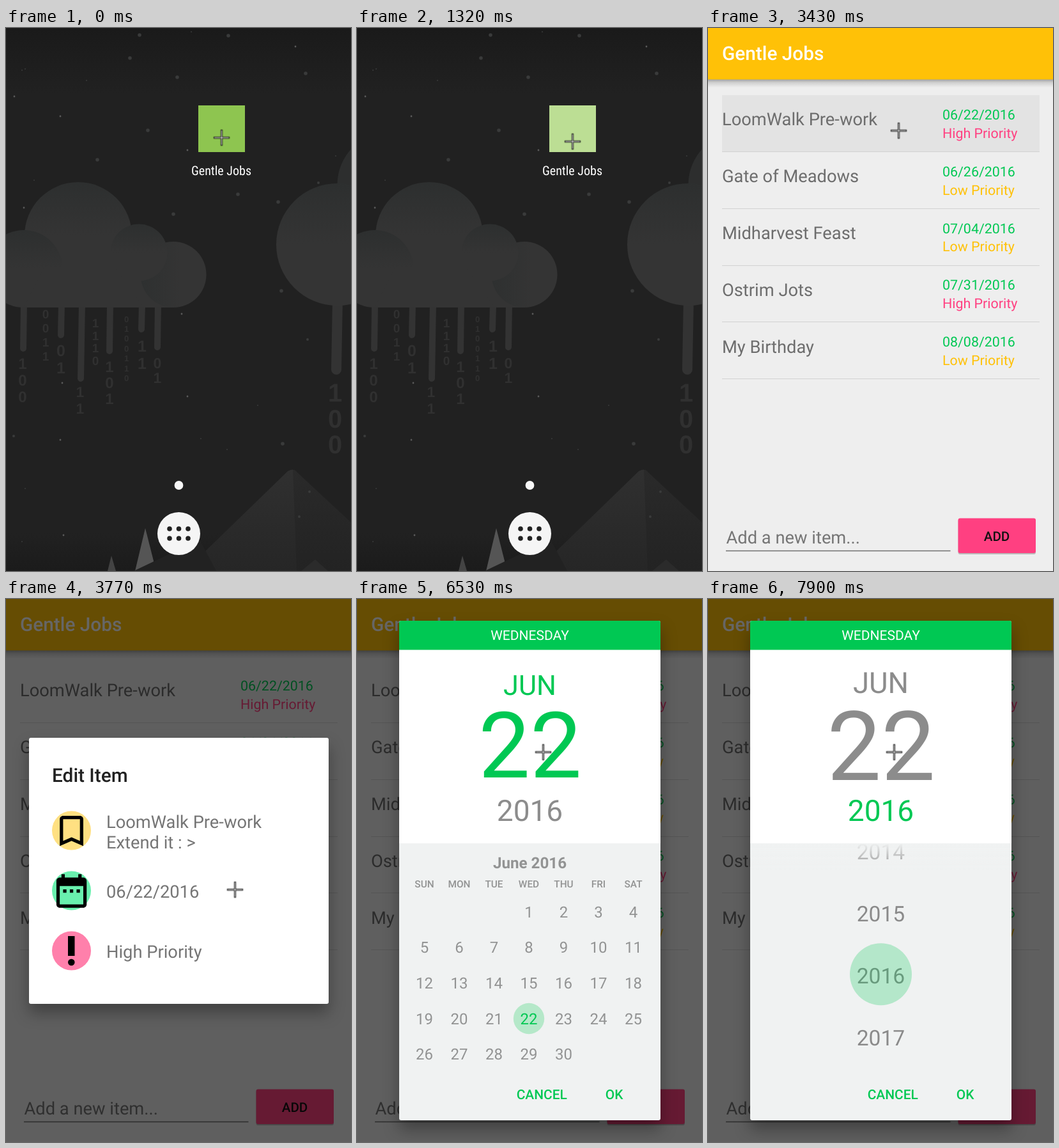
These frames come from a looping animation (540 by 849 pixels, 8000 ms). An HTML page:

```html
<!DOCTYPE html>
<html lang="en">
<head>
<meta charset="utf-8">
<title>Gentle Jobs</title>
<style>
html, body { margin: 0; width: 100%; height: 100%; overflow: hidden; background: #eee; }
svg { display: block; width: 540px; height: 849px; font-family: Roboto, "Open Sans", sans-serif; text-rendering: geometricPrecision; }
.mid { text-anchor: middle; }
.med { font-weight: 500; }
.body { font-size: 27.3px; fill: #6d6d6d; }
.meta { font-size: 21.4px; fill: #00c853; }
.high { fill: #ff4081; }
.low { fill: #ffc107; }
.stars { stroke: #3a3b3b; stroke-linecap: round; fill: none; }
.rain { stroke: #333; stroke-width: 10; stroke-linecap: round; fill: none; }
.bits { font-family: "Liberation Sans", Arial, sans-serif; font-weight: bold; fill: #303030; }
.sheet { filter: drop-shadow(0 14px 12px rgba(0, 0, 0, .32)); }
.grey { fill: #929393; }

/* hard cuts only */
.home, .icon, .press, .dim, .edit, .picker, .days, .years, .date, .year, .cursor {
  animation: 8s step-end infinite;
}
.home { animation-name: home; }
.icon { fill: #8ec550; animation-name: icon; }
.press { animation-name: press; }
.dim { animation-name: dim; }
.edit { animation-name: edit; }
.picker { animation-name: picker; }
.days { animation-name: days; }
.years { animation-name: years; }
.date { transform-origin: 271px 198px; animation-name: date; }
.year { transform-origin: 270.5px 331px; animation-name: year; }
.cursor { animation-name: cursor; }

@keyframes home { 0% { visibility: visible; } 21.125%, 100% { visibility: hidden; } }
@keyframes icon { 0% { fill: #8ec550; } 16.5%, 100% { fill: #bcde94; } }
@keyframes press { 0% { visibility: hidden; } 42.875% { visibility: visible; } 47.125%, 100% { visibility: hidden; } }
@keyframes dim { 0% { visibility: hidden; } 47.125%, 100% { visibility: visible; } }
@keyframes edit { 0% { visibility: hidden; } 47.125% { visibility: visible; } 68.25%, 100% { visibility: hidden; } }
@keyframes picker { 0% { opacity: 0; } 68.25%, 100% { opacity: 1; } }
@keyframes days { 0% { visibility: visible; } 85.625%, 100% { visibility: hidden; } }
@keyframes years { 0% { visibility: hidden; } 85.625%, 100% { visibility: visible; } }
@keyframes date {
  0% { transform: none; fill: #00c853; }
  72.625% { transform: scale(1.038); fill: #00c853; }
  77.125% { transform: none; fill: #00c853; }
  81.625% { transform: scale(.95); fill: #00c853; }
  85.625%, 100% { transform: none; fill: #8c8c8c; }
}
@keyframes year {
  0% { transform: none; fill: #8c8c8c; }
  85.625% { transform: scale(1.04); fill: #00c853; }
  94.375%, 100% { transform: none; fill: #00c853; }
}
@keyframes cursor {
  0% { transform: translate(337.5px, 171.5px); }
  16.5% { transform: translate(337.5px, 177.5px); }
  21.125% { transform: translate(298.5px, 160.5px); }
  47.125% { transform: translate(358.5px, 454.5px); }
  77.125% { transform: translate(291.5px, 239.5px); }
  85.625% { transform: translate(450.5px, 580.5px); }
  98.75%, 100% { transform: translate(291.5px, 239.5px); }
}
</style>
</head>
<body>
<svg viewBox="0 0 540 849" xmlns="http://www.w3.org/2000/svg">
  <defs>
    <linearGradient id="sky" x2="0" y2="1">
      <stop offset="0" stop-color="#1a1a1a"/><stop offset=".12" stop-color="#212121"/>
      <stop offset=".93" stop-color="#212121"/><stop offset="1" stop-color="#1b1b1b"/>
    </linearGradient>
    <linearGradient id="puff" x2="0" y2="1">
      <stop offset="0" stop-color="#2d2f2f"/><stop offset=".5" stop-color="#343434"/>
    </linearGradient>
    <linearGradient id="puffSide">
      <stop offset="0" stop-color="#2e3030"/><stop offset=".6" stop-color="#343434"/>
    </linearGradient>
    <linearGradient id="slope" x2="0" y2="1">
      <stop offset="0" stop-color="#303030"/><stop offset="1" stop-color="#262626"/>
    </linearGradient>
    <linearGradient id="slopeDark" x2="0" y2="1">
      <stop offset="0" stop-color="#2a2a2a"/><stop offset="1" stop-color="#232323"/>
    </linearGradient>
    <linearGradient id="barShade" x2="0" y2="1">
      <stop offset="0" stop-opacity=".34"/><stop offset=".4" stop-opacity=".13"/><stop offset="1" stop-opacity="0"/>
    </linearGradient>
    <linearGradient id="fade" x2="0" y2="1">
      <stop offset="0" stop-color="#f0f2f2"/><stop offset="1" stop-color="#f0f2f2" stop-opacity="0"/>
    </linearGradient>
    <clipPath id="panel"><path d="M66 382h409v350H66z"/></clipPath>
  </defs>

  <!-- list screen -->
  <rect width="540" height="849" fill="#eee"/>
  <rect y="80" width="540" height="13" fill="url(#barShade)"/>
  <rect width="540" height="80.5" fill="#ffc107"/>
  <text class="med" x="22" y="50" font-size="29.8" fill="#fff">Gentle Jobs</text>
  <rect class="press" x="22" y="105" width="497" height="88" fill="#e3e3e3"/>
  <g id="list"></g>
  <text class="body" x="28.5" y="806" style="fill:#757575">Add a new item...</text>
  <path d="M28 817.5h351.5" stroke="#707070" stroke-width="1.4"/>
  <rect x="391.5" y="768" width="121.5" height="55" rx="3" fill="#000" opacity=".22"/>
  <rect x="391.5" y="766.5" width="121.5" height="54.5" rx="3" fill="#ff4081"/>
  <text class="mid med" x="452" y="802" font-size="20.6" fill="#111">ADD</text>

  <rect class="dim" width="540" height="849" opacity=".6"/>

  <!-- edit dialog -->
  <g class="edit">
    <rect class="sheet" x="36" y="217" width="469" height="416" rx="3" fill="#fff"/>
    <text class="med" x="72" y="286" font-size="29.8" fill="#212121">Edit Item</text>
    <circle cx="102.5" cy="362" r="30.5" fill="#ffe082"/>
    <circle cx="102.5" cy="456" r="30.5" fill="#69f0ae"/>
    <circle cx="102.5" cy="550" r="30.5" fill="#ff80ab"/>
    <path transform="translate(71 331) scale(2.63)" d="M17 3H7c-1.1 0-2 .9-2 2v16l7-3 7 3V5c0-1.1-.9-2-2-2zm0 15l-5-2.18L7 18V5h10v13z"/>
    <path transform="translate(71 425) scale(2.63)" d="M9 11H7v2h2v-2zm4 0h-2v2h2v-2zm4 0h-2v2h2v-2zm2-7h-1V2h-2v2H8V2H6v2H5c-1.1 0-2 .9-2 2v14c0 1.1.9 2 2 2h14c1.1 0 2-.9 2-2V6c0-1.1-.9-2-2-2zm0 16H5V9h14v11z"/>
    <path d="M97 527h10.5v31H97z"/><circle cx="102.3" cy="568" r="5.3"/>
    <g class="body" style="fill:#757575">
      <text x="157" y="357.5">LoomWalk Pre-work</text>
      <text x="157" y="389.5">Extend it : &gt;</text>
      <text x="157" y="467">06/22/2016</text>
      <text x="157" y="561">High Priority</text>
    </g>
  </g>

  <!-- date picker -->
  <g class="picker">
    <rect class="sheet" x="66" y="34" width="409" height="781" rx="3" fill="#f0f2f2"/>
    <path d="M66 79.5h409V382H66z" fill="#fff"/>
    <path d="M66 79.5V37q0-3 3-3h403q3 0 3 3v42.5z" fill="#00c853"/>
    <text class="mid" x="270.5" y="64" font-size="21" fill="#fff">WEDNESDAY</text>
    <g class="date mid">
      <text x="270.5" y="147" font-size="45.6">JUN</text>
      <text x="271" y="283" font-size="151">22</text>
    </g>
    <text class="year mid" x="270.5" y="347" font-size="46">2016</text>
    <g class="days mid grey">
      <text x="270.5" y="421" font-size="24.2" font-weight="700">June 2016</text>
      <g id="week" class="med" font-size="15.4"></g>
      <circle cx="269" cy="656" r="24.2" fill="#b5e8c9"/>
      <g id="month" font-size="24"></g>
    </g>
    <g class="years mid" clip-path="url(#panel)">
      <g id="decade" font-size="33.6" fill="#8a8a8a"></g>
      <circle cx="270.5" cy="586.7" r="48.5" fill="#00c853" opacity=".25"/>
      <path d="M66 382h409v42H66z" fill="url(#fade)"/>
    </g>
    <g class="mid med" font-size="20.9" fill="#00c853">
      <text x="289.3" y="781.5">CANCEL</text>
      <text x="402.5" y="781.5">OK</text>
    </g>
  </g>

  <!-- home screen -->
  <g class="home">
    <rect width="540" height="849" fill="url(#sky)"/>
    <g class="stars">
      <path stroke-width="5.6" d="M209 11h0M348 12h0M194 47h0M268 77h0M469 71h0M222 160h0M143 206h0M262 291h0M363 260h0M426 272h0M431 411h0M433 650h0"/>
      <path stroke-width="4" d="M472 487h0M12 638h0M489 242h0"/>
      <path stroke-width="2.8" stroke="#5a5a5a" d="M85 138h0M13 107h0M453 29h0M284 191h0M28 281h0M275 447h0M284 576h0M85 644h0M90 793h0M88 555h0"/>
      <path stroke-width="2" d="M290 6h0M126 82h0M30 64h0M25 66h0M394 590h0M305 642h0M346 659h0M25 803h0M30 720h0M516 200h0M44 238h0"/>
    </g>
    <path class="rain" d="M28 430l-1 71M87 430l-1 50M119 430l-2 118M163 430l-1 75M213 430l-1 41M238 430l-1 69"/>
    <path class="rain" stroke-width="16" style="stroke-width:16px" d="M519 425l-2 109"/>
    <g id="bits" class="bits mid"></g>
    <circle cx="113" cy="325" r="84" fill="url(#puff)"/>
    <path d="M28 374h234v63H28z" fill="#343434"/>
    <circle cx="28" cy="376.5" r="60.5" fill="url(#puff)"/>
    <circle cx="262" cy="385.5" r="51.5" fill="url(#puffSide)"/>
    <circle cx="208" cy="351" r="44.5" fill="url(#puff)"/>
    <path d="M60 374h110l45 62H28z" fill="#343434"/>
    <circle cx="601" cy="245" r="82.5" fill="#2d2e2e"/>
    <circle cx="518.5" cy="338.5" r="95.5" fill="url(#puff)"/>
    <path d="M280 849L441 693q8-5 13 0l3 156z" fill="url(#slope)"/>
    <path d="M449 691q4 0 7 4l84 78v76h-85z" fill="url(#slopeDark)"/>
    <path d="M462 849l22-18 20 18z" fill="#2b2b2b"/>
    <path d="M475 725h0M459 764h0" class="stars" stroke-width="4"/>
    <path d="M202 849l16-67 17 67z" fill="#555"/>
    <path d="M159 849l6-24 7 24z" fill="#434343"/>
    <path d="M200 849l103-49 26 49z" fill="#222"/>
    <circle cx="270.5" cy="715" r="6.9" fill="#f7f7f7"/>
    <circle cx="270.5" cy="790.5" r="33.5" fill="#f5f5f5"/>
    <path d="M256 783h0m14.5 0h0m14.5 0h0M256 798h0m14.5 0h0m14.5 0h0" stroke="#212121" stroke-width="7.6" stroke-linecap="round"/>
    <rect class="icon" x="301" y="121" width="73" height="73"/>
    <text class="mid" x="337" y="230" font-size="20" fill="#fff" style="font-family:'Roboto Condensed',Roboto,sans-serif;font-stretch:condensed">Gentle Jobs</text>
  </g>

  <g class="cursor" fill="none">
    <path d="M-12.5 0h25M0-12.5v25" stroke="#000" stroke-width="3"/>
    <path d="M-11.5 0h23M0-11.5v23" stroke="#fff" stroke-width="1"/>
  </g>
</svg>
<script>
const text = (x, y, s, attrs = '') => `<text x="${x}" y="${y}" ${attrs}>${s}</text>`;
const fill = (id, items) => { document.getElementById(id).innerHTML = items.join(''); };

const tasks = [
  ['LoomWalk Pre-work', '06/22', 'High'],
  ['Gate of Meadows', '06/26', 'Low'],
  ['Midharvest Feast', '07/04', 'Low'],
  ['Ostrim Jots', '07/31', 'High'],
  ['My Birthday', '08/08', 'Low'],
];
fill('list', tasks.map(([name, day, level], i) => {
  const y = 88.8 * i;
  return text(22, 152.3 + y, name, 'class="body"')
    + text(367, 143 + y, day + '/2016', 'class="meta"')
    + text(367, 171.8 + y, level + ' Priority', `class="meta ${level.toLowerCase()}"`)
    + `<path d="M22 ${Math.round(193 + y) + .5}h497" stroke="#d2d2d2"/>`;
}));

const column = i => 105.5 + 54.5 * i;
fill('week', 'SUN MON TUE WED THU FRI SAT'.split(' ').map((d, i) => text(column(i), 450.7, d)));
fill('month', Array.from({ length: 30 }, (_, i) => {
  const cell = i + 3; // the month starts on a Wednesday
  return text(column(cell % 7), 497.8 + 55.6 * Math.floor(cell / 7), i + 1, i === 21 ? 'fill="#00c853"' : '');
}));
fill('decade', [0, 1, 2, 3].map(i => text(270.5, 406.5 + 97 * i, 2014 + i)));

// falling digits: x, first centre, step, size, digits
const drops = [
  [26, 524, 26, 24, '100'], [62, 447, 22, 19, '0011'], [86, 504, 27, 25, '01'],
  [116, 569, 26, 23, '11'], [140, 461, 19.7, 19, '1110'], [162, 529, 25, 24, '101'],
  [188.5, 455, 15.4, 13, '0100110'], [213, 497, 27, 25, '11'], [237, 524, 23, 23, '01'],
  [515, 570, 40.5, 40, '100'],
];
fill('bits', drops.flatMap(([x, y, step, size, digits]) =>
  [...digits].map((d, i) => text(x, y + step * i + size * .36, d, `font-size="${size}"`))));
</script>
</body>
</html>
```
